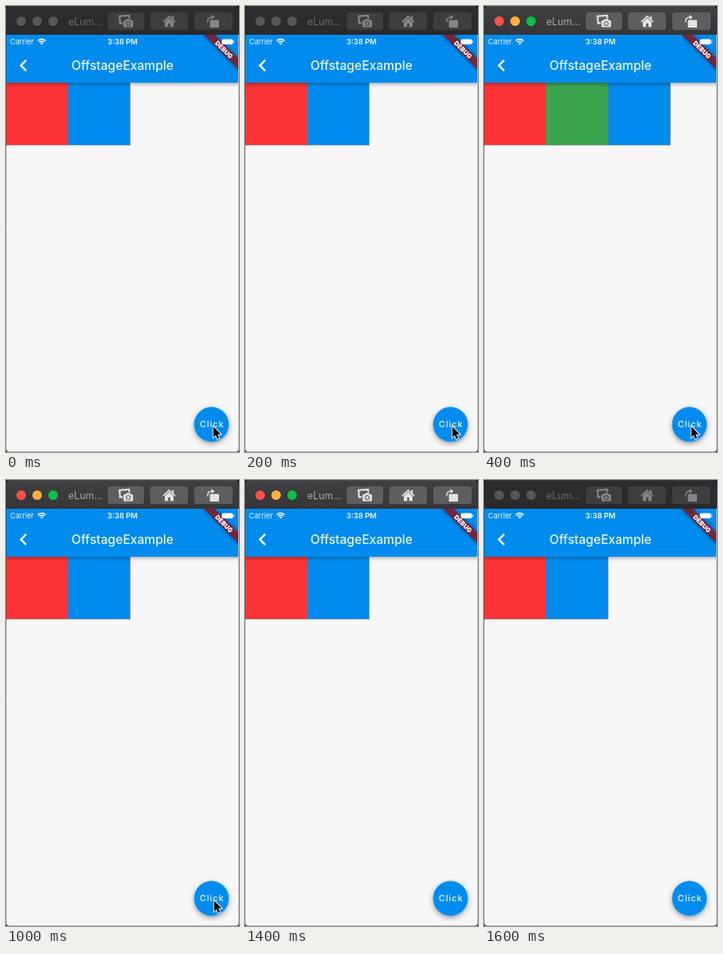
Animation of 292 by 558 pixels, one loop 1.8 s. Source, as an HTML page with a canvas:

```html
<!DOCTYPE html>
<html lang="en">
<head>
<meta charset="utf-8">
<title>Offstage example</title>
<style>
html, body { margin: 0; width: 100%; height: 100%; overflow: hidden; background: #171718; }
canvas { display: block; width: 292px; height: 558px; }
</style>
</head>
<body>
<canvas id="stage"></canvas>
<script>
const W = 292, H = 558, LOOP = 1800, BAR = 36, BOX = 77.87;
const BLUE = '#008bee', PALE = '#e8f8fd', EDGE = '#8d8d90';
const FONT = 'Inter, "Open Sans", sans-serif';
const canvas = document.getElementById('stage');
const ratio = window.devicePixelRatio || 1;
canvas.width = Math.round(W * ratio);
canvas.height = Math.round(H * ratio);
const c = canvas.getContext('2d');

function rect(x, y, w, h, color) {
  c.fillStyle = color;
  c.fillRect(x, y, w, h);
}

function round(x, y, w, h, r, color) {
  c.fillStyle = color;
  c.beginPath();
  c.roundRect(x, y, w, h, r);
  c.fill();
}

function disc(x, y, r, color) {
  c.fillStyle = color;
  c.beginPath();
  c.arc(x, y, r, 0, Math.PI * 2);
  c.fill();
}

function trace(points, close) {
  c.beginPath();
  points.forEach(([x, y]) => c.lineTo(x, y));
  if (close) c.closePath();
}

function poly(points, color) {
  trace(points, true);
  c.fillStyle = color;
  c.fill();
}

function line(points, color, width) {
  trace(points, false);
  c.strokeStyle = color;
  c.lineWidth = width;
  c.stroke();
}

function text(s, x, y, size, weight, color, align = 'left', spacing = 0) {
  c.font = `${weight} ${size}px ${FONT}`;
  c.letterSpacing = spacing + 'px';
  c.textAlign = align;
  c.fillStyle = color;
  c.fillText(s, x, y);
  c.letterSpacing = '0px';
}

function shadow(color, blur, y = 0) {
  c.shadowColor = color;
  c.shadowBlur = blur * ratio;
  c.shadowOffsetY = y * ratio;
}

const noShadow = () => shadow('transparent', 0);

function cameraIcon(color, back) {
  c.save();
  c.translate(148.5, 16.5);
  c.rotate(-0.08);
  c.strokeStyle = color;
  c.lineWidth = 2.2;
  c.strokeRect(-5.9, -4.2, 12, 8.8);
  c.restore();
  round(146.2, 15.6, 14, 12, 2, back);
  round(147.2, 17.8, 12, 8.8, 1.5, color);
  round(150.5, 16.3, 5.4, 3, 1, color);
  disc(153.2, 22, 3, back);
  disc(153.2, 22, 1.9, color);
}

function homeIcon(color, back) {
  rect(208.2, 12.5, 2, 5, color);
  line([[197, 19.8], [204.5, 12.8], [212, 19.8]], color, 1.7);
  poly([[199, 20], [204.5, 15], [210, 20], [210, 26.3], [199, 26.3]], color);
  rect(203.2, 21.8, 2.6, 4.5, back);
}

function rotateIcon(color) {
  round(255.5, 17.5, 11.5, 9.5, 1, color);
  c.strokeStyle = color;
  c.lineWidth = 1.5;
  c.beginPath();
  c.moveTo(252.5, 20.5);
  c.quadraticCurveTo(252.5, 14, 258, 14);
  c.stroke();
  poly([[261.5, 14], [257.5, 10.9], [257.5, 17.1]], color);
}

function titleBar(active) {
  const top = c.createLinearGradient(0, 0, 0, BAR);
  top.addColorStop(0, active ? '#403f41' : '#2d2c2e');
  top.addColorStop(1, active ? '#363537' : '#2a292b');
  rect(0, 0, W, BAR, top);
  rect(0, 0, W, 1, active ? '#5a595b' : '#424143');
  const lamps = active ? ['#fd4f4b', '#fdb040', '#08c048'] : Array(3).fill('#575658');
  lamps.forEach((color, i) => disc(19 + i * 20, 19, 6, color));
  text('eLum...', 78, 23.5, 12.4, 400, active ? '#a9a8aa' : '#69686a');

  const back = active ? '#5e5d5f' : '#3e3d3f';
  const icon = active ? '#e3e2e4' : '#858486';
  [[127.5, 45.5], [180.5, 47.5], [236, 48]].forEach(([x, w]) => round(x, 8, w, 22, 3.5, back));
  cameraIcon(icon, back);
  homeIcon(icon, back);
  rotateIcon(icon);
}

function wifi(x, y) {
  c.strokeStyle = '#fff';
  c.lineWidth = 1.5;
  for (const r of [4.3, 7]) {
    c.beginPath();
    c.arc(x, y, r, -Math.PI * 0.75, -Math.PI * 0.25);
    c.stroke();
  }
  c.fillStyle = '#fff';
  c.beginPath();
  c.moveTo(x, y);
  c.arc(x, y, 2.4, -Math.PI * 0.75, -Math.PI * 0.25);
  c.fill();
}

function banner() {
  c.save();
  c.beginPath();
  c.rect(0, BAR, W, H);
  c.clip();
  c.translate(W, BAR);
  c.rotate(Math.PI / 4);
  shadow('rgba(0,0,0,.5)', 5);
  rect(-31.2, 21.8, 62.4, 9.4, '#73263c');
  noShadow();
  text('DEBUG', 0, 29.4, 7.9, 900, '#fff', 'center');
  c.restore();
}

function appBar() {
  shadow('rgba(0,0,0,.3)', 4.5, 1.5);
  rect(0, BAR, W, 60, BLUE);
  noShadow();
  text('Carrier', 5, 48, 9.2, 400, PALE);
  wifi(44.7, 48.6);
  text('3:38 PM', 146, 48, 9.4, 600, PALE, 'center');
  line([[25.3, 67.7], [18.7, 74.4], [25.3, 81.1]], '#fff', 2.4);
  text('OffstageExample', 146, 80.2, 15.6, 500, PALE, 'center');
  banner();
  round(270.5, 41.5, 14, 6.5, 1.8, '#fff');
  rect(285.2, 43.5, 1, 2.5, '#cfe8fc');
}

function boxes(green) {
  const colors = green ? ['#fb3334', '#3ba54f', BLUE] : ['#fb3334', BLUE];
  const end = colors.length * BOX;
  rect(0, 96, end, 78.4, EDGE);
  colors.forEach((color, i) => rect(i * BOX, 96, BOX, 77.8, color));
  rect(end - 0.6, 96, 0.8, 78.4, EDGE);
}

function button(pressed) {
  shadow('rgba(0,0,0,.36)', pressed ? 8 : 6, pressed ? 4 : 2.5);
  disc(257.5, 523.5, 21.9, pressed ? '#2b96de' : BLUE);
  noShadow();
  c.strokeStyle = 'rgba(90,215,250,.4)';
  c.lineWidth = 0.8;
  c.beginPath();
  c.arc(257.5, 523.5, 21.5, 0, Math.PI * 2);
  c.stroke();
  text('Click', 258.1, 527.2, 10.9, 500, PALE, 'center', 1);
}

function cursor(x, y) {
  const arrow = [[0, 0], [0, 13.4], [3, 10.6], [5.1, 15.4], [7.4, 14.4], [5.3, 9.7], [9.4, 9.5]];
  const points = arrow.map(([a, b]) => [x + a, y + b]);
  trace(points, true);
  c.strokeStyle = '#fff';
  c.lineWidth = 1.8;
  c.stroke();
  poly(points, '#050505');
}

function draw(t) {
  const active = t >= 400 && t < 1600;
  const corners = [5, 5, 4, 4];
  c.setTransform(canvas.width / W, 0, 0, canvas.height / H, 0, 0);
  rect(0, 0, W, H, '#171718');
  c.save();
  c.beginPath();
  c.roundRect(0, 0, W, H, corners);
  c.clip();
  rect(0, BAR, W, H - BAR, '#f7f7f7');
  boxes(t >= 400 && t < 800);
  appBar();
  titleBar(active);
  button(t >= 800 && t < 1000);
  if (t < 1200) cursor(t < 800 ? 259.8 : 260.8, 526.3);
  c.strokeStyle = 'rgba(40,40,45,.4)';
  c.lineWidth = 1;
  c.beginPath();
  c.roundRect(0.25, 0.25, W - 0.5, H - 0.5, corners);
  c.stroke();
  rect(W - 1, BAR, 1, H - BAR - 4, '#b4b4b7');
  c.restore();
}

const start = performance.now();
function tick() {
  draw((performance.now() - start) % LOOP);
  requestAnimationFrame(tick);
}
tick();
</script>
</body>
</html>
```
